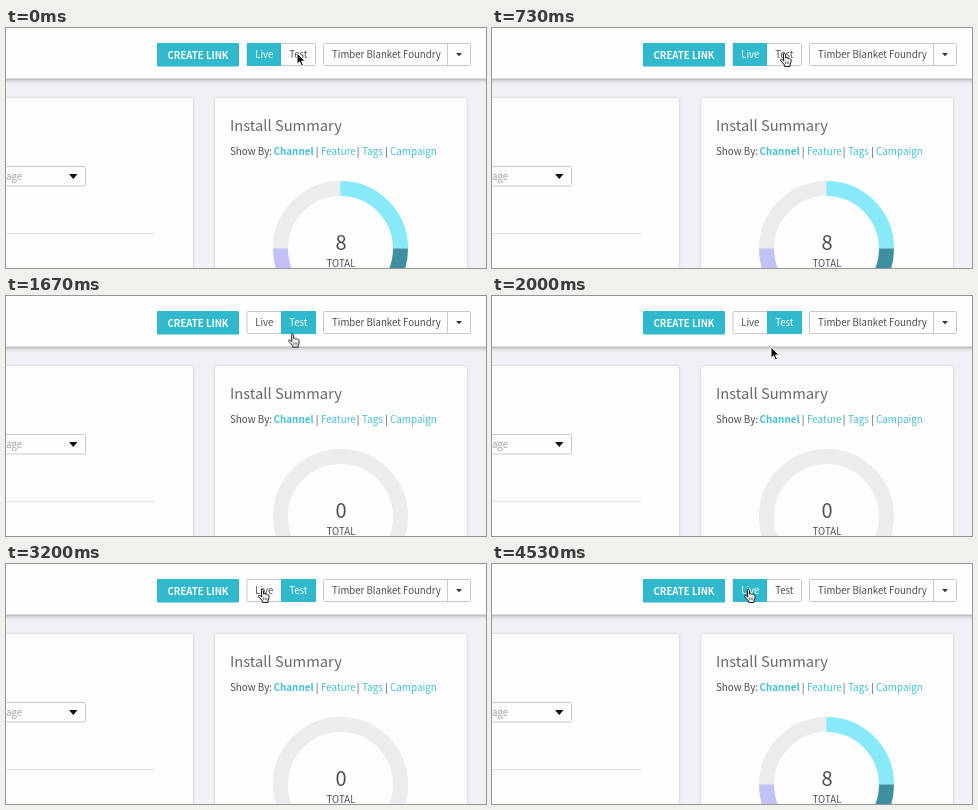
Recreate the animation shown at these times as an HTML page. Size 480 by 240 pixels, loop 4.59 s.

```html
<!DOCTYPE html>
<html lang="en">
<head>
<meta charset="utf-8">
<title>Live and test toggle</title>
<style>
html, body { margin: 0; width: 100%; height: 100%; overflow: hidden; background: #eff1f4; }
svg { display: block; width: 100vw; height: 100vh; }
text { font: 400 9.65px "Noto Sans CJK JP", "Noto Sans CJK SC", "Noto Sans CJK", "Noto Sans", sans-serif; fill: #4b4b50; }
.bold { font-weight: 700; }
.title { font-size: 14.7px; font-weight: 500; fill: #68686c; }
.filter text { font-size: 9.85px; font-weight: 300; }
.filter .link { fill: #45bfd3; }
.filter .bold { font-weight: 700; }
.count { font-size: 20px; font-weight: 300; }
.mid { text-anchor: middle; }
.white { fill: #fff; }
.muted { fill: #a2a2a6; }
.brand { fill: #30b8cc; }
.box { fill: #fefdfe; stroke: #c9c9cd; }
.card { fill: #fefdfe; filter: drop-shadow(0 .5px 1px rgba(0,0,0,.22)); }
.header { fill: #fefdfe; filter: drop-shadow(0 1px 2px rgba(0,0,0,.38)); }
.ring { fill: none; stroke-width: 15; }

.live, .test, .full, .empty, .arrow, .hand { animation: on 4.59s step-end infinite; }
.test { animation-name: off; }
.full { animation-name: data-on; }
.empty { animation-name: data-off; }
.arrow { animation-name: point; }
.hand { animation-name: grab; }
.cursor { animation: move 4.59s ease-in-out infinite; }

/* the data follows the toggle by one step */
@keyframes on { 0%, 74.07% { opacity: 1 } 20.26% { opacity: 0 } }
@keyframes off { 0%, 74.07% { opacity: 0 } 20.26% { opacity: 1 } }
@keyframes data-on { 0%, 75.6% { opacity: 1 } 21.79% { opacity: 0 } }
@keyframes data-off { 0%, 75.6% { opacity: 0 } 21.79% { opacity: 1 } }
@keyframes point { 0%, 36.6% { opacity: 1 } 13.07%, 56% { opacity: 0 } }
@keyframes grab { 0%, 36.6% { opacity: 0 } 13.07%, 56% { opacity: 1 } }
@keyframes move {
  0%, 30.5% { transform: translate(291px, 25px) }
  42.48%, 51.2% { transform: translate(279px, 51px) }
  61%, 100% { transform: translate(255px, 25px) }
}
</style>
</head>
<body>
<svg viewBox="0 0 480 240">
  <rect width="480" height="240" fill="#eff1f4"/>
  <rect class="card" x="-10" y="70" width="197" height="190" rx="2"/>
  <rect class="card" x="209" y="70" width="252" height="190" rx="2"/>
  <rect class="header" x="-10" y="-10" width="500" height="60.5"/>

  <rect class="brand" x="151" y="15" width="82" height="23.5" rx="1"/>
  <text class="bold white mid" x="192" y="30.5">CREATE LINK</text>

  <rect class="box" x="241" y="15.5" width="68.5" height="22" rx="1"/>
  <g class="live">
    <rect class="brand" x="241" y="15" width="34" height="23"/>
    <text class="white mid" x="258.3" y="30">Live</text>
    <text class="mid" x="292.3" y="30">Test</text>
  </g>
  <g class="test">
    <rect class="brand" x="275" y="15" width="35" height="23"/>
    <text class="mid" x="258.3" y="30">Live</text>
    <text class="white mid" x="292.3" y="30">Test</text>
  </g>

  <rect class="box" x="317.5" y="15.5" width="147" height="22" rx="1"/>
  <path d="M441.5 16v21" stroke="#c9c9cd"/>
  <text x="326" y="30">Timber Blanket Foundry</text>
  <path d="M450 25h6l-3 3.3z" fill="#333"/>

  <rect class="box" x="-9.5" y="138.5" width="89" height="19.5" rx="1"/>
  <text class="muted" x="0" y="152">age</text>
  <path d="M63 146h8.5l-4.25 5z" fill="#111"/>
  <path d="M0 205.5h149" stroke="#e0e0e3"/>

  <text class="title" x="224" y="102.5">Install Summary</text>
  <g class="filter">
    <text x="224" y="127">Show By:</text>
    <text class="link bold" x="267.5" y="127">Channel</text>
    <text x="309.7" y="127">|</text>
    <text class="link" x="315" y="127">Feature</text>
    <text x="350.8" y="127">|</text>
    <text class="link" x="356" y="127">Tags</text>
    <text x="379" y="127">|</text>
    <text class="link" x="384" y="127">Campaign</text>
  </g>

  <circle class="ring" cx="334.5" cy="220.5" r="60" stroke="#ecebee"/>
  <g class="full">
    <path class="ring" d="M334.5 160.5a60 60 0 0 1 60 60" stroke="#88e9f9"/>
    <path class="ring" d="M394.5 220.5a60 60 0 0 1-60 60" stroke="#3e8f9f"/>
    <path class="ring" d="M334.5 280.5a60 60 0 0 1-60-60" stroke="#c2c1f6"/>
    <text class="count mid" x="335" y="221.5">8</text>
  </g>
  <text class="count mid empty" x="335" y="221.5">0</text>
  <text class="mid" x="335" y="239">TOTAL</text>

  <g class="cursor" stroke-linejoin="round">
    <path class="arrow" d="M0 0v11.2l2.6-2.4 1.8 4.2 2-.9-1.8-4h3.6z" fill="#111" stroke="#fff" stroke-width=".9"/>
    <g class="hand">
      <path d="M.3 1.2C.3-.1 2.2-.1 2.3 1.2l.4 3.9c.5-.7 1.7-.5 1.9.3.7-.6 1.7-.2 1.9.6.9-.4 1.6.2 1.6 1.2 0 2-.3 3-1.1 4.6v1.6H1.6v-1.3C.4 10.7-1.1 9.2-2.3 7.8c-.8-1 .4-2 1.4-1.2L.8 8z" fill="#fff" stroke="#111" stroke-width="1"/>
      <path d="M2.6 8.5v2.7M4.2 8.5v2.7M5.8 8.5v2.7" stroke="#111" stroke-width=".6"/>
    </g>
  </g>
</svg>
</body>
</html>
```
